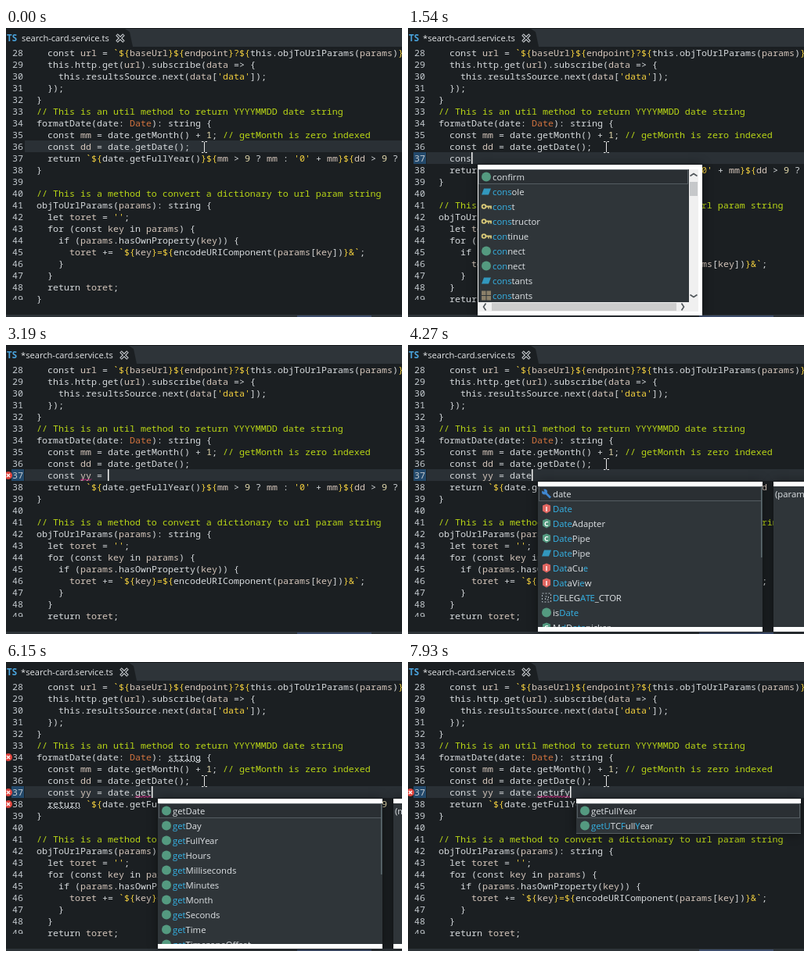
Animation of 506x370 px, one loop 8000 ms. Source, as an HTML page with a canvas:

```html
<!DOCTYPE html>
<html lang="en">
<head>
<meta charset="utf-8">
<title>Code completion</title>
<style>
html, body { margin: 0; width: 100%; height: 100%; overflow: hidden; background: #1b1f22; }
canvas { display: block; }
</style>
</head>
<body>
<canvas id="stage" width="506" height="370"></canvas>
<script>
const ctx = document.getElementById('stage').getContext('2d');
const LOOP = 8000, COL = 7, ROW = 15, LEFT = 25, TOP = 24, FIRST = 28;
const MONO = '11.667px "Noto Sans Mono", monospace';
const UI = '11.3px "Open Sans", sans-serif';
const BG = '#1b1f22', PANEL = '#2f3539', TEXT = '#d6dadd', CYAN = '#35b4e8', PINK = '#e8208a';

const head = [
  '    const url = `${baseUrl}${endpoint}?${this.objToUrlParams(params)}`;',
  '    this.http.get(url).subscribe(data => {',
  "      this.resultsSource.next(data['data']);",
  '    });',
  '  }',
  '  // This is an util method to return YYYYMMDD date string',
  '  formatDate(date: Date): string {',
  '    const mm = date.getMonth() + 1; // getMonth is zero indexed',
  '    const dd = date.getDate();'
];
const tail = [
  "    return `${date.getFullYear()}${mm > 9 ? mm : '0' + mm}${dd > 9 ? dd : '0' + dd}`;",
  '  }',
  '',
  '  // This is a method to convert a dictionary to url param string',
  '  objToUrlParams(params): string {',
  "    let toret = '';",
  '    for (const key in params) {',
  '      if (params.hasOwnProperty(key)) {',
  '        toret += `${key}=${encodeURIComponent(params[key])}&`;',
  '      }',
  '    }',
  '    return toret;',
  '  }'
];

const withIcon = (icon, names) => names.split(' ').map(name => ({ icon, name }));
const lists = {
  cons: [
    ...withIcon('dot', 'confirm'), ...withIcon('slab', 'console'),
    ...withIcon('key', 'const constructor continue'),
    ...withIcon('dot', 'connect connect'), ...withIcon('slab', 'constants'),
    ...withIcon('grid', 'constants')
  ],
  date: [
    ...withIcon('wrench', 'date'), ...withIcon('I', 'Date'),
    ...withIcon('C', 'DateAdapter DatePipe'), ...withIcon('slab', 'DatePipe'),
    ...withIcon('I', 'DataCue DataView'), ...withIcon('frame', 'DELEGATE_CTOR'),
    ...withIcon('dot', 'isDate'), ...withIcon('C', 'MdDatepicker')
  ],
  get: withIcon('dot', 'getDate getDay getFullYear getHours getMilliseconds getMinutes getMonth getSeconds getTime getTimezoneOffset'),
  getu: withIcon('dot', 'getFullYear getMinutes getUTCDate getUTCDay getUTCFullYear getUTCHours getUTCMilliseconds getUTCMinutes getUTCMonth getUTCSeconds'),
  year: withIcon('dot', 'getFullYear getUTCFullYear'),
  none: [{ icon: '', name: 'No Default Proposals' }]
};

// Each step changes only the listed properties of the state.
const steps = [
  [0, { added: false, typed: '', caret: false, mouse: true, list: '', query: '', info: '', bad: [], mark: null, hints: false }],
  [290, { caret: true }],
  [610, { added: true, mouse: false }],
  [1310, { typed: 'c' }],
  [1390, { typed: 'co' }],
  [1470, { typed: 'con' }],
  [1540, { typed: 'cons', list: 'cons', query: 'cons', mouse: true }],
  [1620, { typed: 'const', query: 'const' }],
  [1850, { typed: 'const ', list: '' }],
  [2230, { bad: [37] }],
  [2400, { typed: 'const y', mouse: false }],
  [2470, { typed: 'const yy' }],
  [2550, { list: 'none', query: '', mouse: true }],
  [2870, { typed: 'const yy ' }],
  [2940, { list: '' }],
  [3020, { typed: 'const yy =', mark: [6, 8] }],
  [3190, { typed: 'const yy = ', mouse: false }],
  [3490, { typed: 'const yy = d' }],
  [3570, { typed: 'const yy = da' }],
  [3720, { typed: 'const yy = dat' }],
  [3800, { typed: 'const yy = date' }],
  [3960, { list: 'date', query: 'date', mouse: true }],
  [4190, { bad: [], mark: null }],
  [4270, { info: '(parameter) date: Date' }],
  [4820, { list: '', info: '' }],
  [5200, { typed: 'const yy = date.', mouse: false }],
  [5370, { list: 'get', query: '', mouse: true }],
  [5520, { typed: 'const yy = date.g', query: 'g' }],
  [5600, { typed: 'const yy = date.ge', query: 'ge' }],
  [5680, { typed: 'const yy = date.get', query: 'get' }],
  [5760, { bad: [34, 38], hints: true }],
  [5840, { info: '(method) Date.getDate(): number' }],
  [6150, { bad: [34, 37, 38], mark: [16, 19] }],
  [6450, { typed: 'const yy = date.getu', list: 'getu', query: 'getu', info: '' }],
  [6760, { typed: 'const yy = date.getuf', query: 'getuf' }],
  [6840, { list: 'year' }],
  [6930, { bad: [37], hints: false }],
  [7160, { mark: null }],
  [7230, { mark: [16, 21] }],
  [7540, { typed: 'const yy = date.getufy', query: 'getufy' }],
  [7860, { mark: null }],
  [7930, { mark: [16, 22] }]
];

function stateAt(time) {
  return Object.assign({}, ...steps.filter(([at]) => at <= time).map(([, change]) => change));
}

function rect(x, y, w, h, color) {
  ctx.fillStyle = color;
  ctx.fillRect(x, y, w, h);
}

function write(text, x, y, color, font) {
  ctx.font = font;
  ctx.fillStyle = color;
  ctx.fillText(text, x, y);
}

function path(points, color, width) {
  ctx.beginPath();
  points.forEach(([x, y]) => ctx.lineTo(x, y));
  if (width) {
    ctx.strokeStyle = color;
    ctx.lineWidth = width;
    ctx.stroke();
  } else {
    ctx.fillStyle = color;
    ctx.fill();
  }
}

function disc(x, y, r, color) {
  ctx.beginPath();
  ctx.arc(x, y, r, 0, Math.PI * 2);
  ctx.fillStyle = color;
  ctx.fill();
}

function cross(x, y, r, color, width) {
  path([[x - r, y - r], [x + r, y + r]], color, width);
  path([[x - r, y + r], [x + r, y - r]], color, width);
}

function clipped(x, y, w, h, draw) {
  ctx.save();
  ctx.beginPath();
  ctx.rect(x, y, w, h);
  ctx.clip();
  draw();
  ctx.restore();
}

const lineTop = n => TOP + 0.5 + (n - FIRST) * ROW - 0.5;
const colX = c => LEFT + c * COL;

const tokens = /(\/\/.*)|('[^']*'|`|\$\{|\}[?=&]?(?=[$`]))|\b(Date)\b|\b(mm|dd|yy|url|key|params|toret|data|baseUrl|endpoint)\b|\b(\d+)\b/g;
const tokenColors = ['#b9d616', '#f2cf3e', '#d2733f', '#d5c6bb', '#e6dcae'];

function codeLine(text, y) {
  let at = 0;
  const put = (part, color) => {
    write(part, colX(at), y, color, MONO);
    at += part.length;
  };
  for (const m of text.matchAll(tokens)) {
    put(text.slice(at, m.index), TEXT);
    put(m[0], tokenColors[m.slice(1).findIndex(Boolean)]);
  }
  put(text.slice(at), TEXT);
}

function squiggle(x0, x1, y, color) {
  const points = [];
  for (let x = x0; x <= x1; x += 2) points.push([x, y + ((x - x0) % 4 ? -1 : 1)]);
  path(points, color, 1);
}

function tabBar(added) {
  const shift = added ? 5 : 0;
  rect(0, 0, 506, 24, '#2e3439');
  path([[0, 1], [152 + shift, 1], [158 + shift, 5], [162 + shift, 24], [0, 24]], BG);
  rect(0, 0, 506, 1, '#181c1f');
  write('TS', 1, 17, '#4aa3dc', 'bold 11.5px "Open Sans", sans-serif');
  write((added ? '*' : '') + 'search-card.service.ts', added ? 19 : 20, 17, '#e4e6e8', '11.15px "Open Sans", sans-serif');
  cross(146 + shift, 13, 4.5, '#d5d9dc', 3.6);
  cross(146 + shift, 13, 4, BG, 1.5);
}

function editor(s) {
  const lines = s.added ? [...head, '    ' + s.typed, ...tail] : [...head, ...tail];
  const active = s.added ? 37 : 36;
  const y = lineTop(active);
  rect(LEFT - 1, y, 506, ROW, '#2a3035');
  if (s.added) rect(7, y, 16, ROW, '#23496b');
  clipped(0, TOP, 506, 334, () => lines.forEach((line, i) => codeLine(line, lineTop(FIRST + i) + 12)));
  clipped(0, TOP, LEFT, 324, () => lines.forEach((_, i) =>
    write(FIRST + i, 8, lineTop(FIRST + i) + 12, '#c3c9ce', MONO)));

  s.bad.forEach(n => {
    disc(3, lineTop(n) + 8, 5, '#e0433c');
    cross(3, lineTop(n) + 8, 2, '#fff', 1.4);
  });
  if (s.hints) {
    squiggle(colX(26), colX(32), 127, '#aeb4b8');
    squiggle(colX(4), colX(10), 187, '#aeb4b8');
  }
  if (s.mark) squiggle(colX(4 + s.mark[0]), colX(4 + s.mark[1]), 172.5, PINK);
  if (s.caret) rect(s.added ? colX(4 + s.typed.length) : 235, y, 1.5, ROW, '#f4f4f4');

  rect(0, 367, 506, 3, '#2d3338');
  rect(372, 368, 95, 2, '#3e4d6c');
}

function mousePointer() {
  const x = 253.5;
  path([[x, 146], [x, 159]], '#e8e8e8', 1);
  [145.5, 159.5].forEach(y => {
    path([[x - 3.5, y], [x - 1, y]], '#e8e8e8', 1);
    path([[x + 1, y], [x + 3.5, y]], '#e8e8e8', 1);
  });
}

function icon(kind, x, y) {
  const green = '#549a80', gold = '#d9c978';
  if (kind === 'dot') disc(x, y, 6, green);
  if (kind === 'slab') path([[x - 3, y - 4], [x + 6, y - 4], [x + 3, y + 4], [x - 6, y + 4]], '#3297bd');
  if (kind === 'key') {
    ctx.beginPath();
    ctx.arc(x - 3, y, 2.4, 0, 7);
    ctx.strokeStyle = gold;
    ctx.lineWidth = 1.8;
    ctx.stroke();
    path([[x - 1, y], [x + 6, y], [x + 6, y + 3]], gold, 1.8);
    path([[x + 3, y], [x + 3, y + 3]], gold, 1.5);
  }
  if (kind === 'grid') {
    for (let i = 0; i < 4; i++) rect(x - 6 + (i % 2) * 6.5, y - 6 + (i >> 1) * 6.5, 5.5, 5.5, '#8b8069');
  }
  if (kind === 'wrench') {
    path([[x - 2, y - 2], [x + 5, y + 5]], '#3f86cf', 2.6);
    disc(x - 2.5, y - 2.5, 3.5, '#3f86cf');
    path([[x - 2.5, y - 2.5], [x - 4, y - 7], [x - 7, y - 4]], PANEL);
  }
  if (kind === 'I' || kind === 'C') {
    path([[x - 5, y - 4], [x, y - 6], [x + 5, y - 4], [x + 5, y + 3], [x, y + 6], [x - 5, y + 3]], kind === 'I' ? '#e16661' : green);
    write(kind, x - (kind === 'I' ? 1.4 : 3), y + 3.5, '#fff', 'bold 9px "Open Sans", sans-serif');
  }
  if (kind === 'frame') {
    ctx.setLineDash([2, 2]);
    ctx.strokeStyle = '#aeb8bf';
    ctx.lineWidth = 1;
    ctx.strokeRect(x - 5.5, y - 5.5, 11, 11);
    ctx.strokeRect(x - 1.5, y - 1.5, 4, 4);
    ctx.setLineDash([]);
  }
}

// Colours the letters of the name that follow the query in order.
function proposal(name, x, y, query) {
  ctx.font = UI;
  let next = 0, done = '';
  for (const ch of name) {
    const hit = next < query.length && ch.toLowerCase() === query[next];
    if (hit) next++;
    write(ch, x + ctx.measureText(done).width, y, hit ? CYAN : '#dfe3e6', UI);
    done += ch;
  }
}

function panel(x, y, w, h) {
  ctx.save();
  ctx.shadowColor = 'rgba(0,0,0,.45)';
  ctx.shadowBlur = 12;
  rect(x, y, w, h, PANEL);
  ctx.restore();
}

function scrollBars(x) {
  rect(x, 181, 1, 186, '#f4f4f4');
  rect(x + 270, 181, 12, 170, '#f0f0f0');
  rect(x + 282, 181, 5, 186, '#fff');
  rect(x + 271, 197, 10, 18, '#c6c8ca');
  rect(x + 1, 351, 281, 12, '#f0f0f0');
  rect(x + 18, 352, 236, 10, '#cdcdcd');
  rect(x, 363, 287, 5, '#fff');
  const arrow = (cx, cy, dx, dy) =>
    path([[cx - dx - dy * 3, cy - dy - dx * 3], [cx + dx, cy + dy], [cx - dx + dy * 3, cy - dy + dx * 3]], '#50565a', 1.6);
  arrow(x + 276, 188, 0, -1.5);
  arrow(x + 276, 343, 0, 1.5);
  arrow(x + 9, 357, -1.5, 0);
  arrow(x + 262, 357, 1.5, 0);
}

function popup(s) {
  const items = lists[s.list], x = colX(4 + s.typed.length) + 8;
  const tall = items.length > 2, bars = s.list === 'cons';
  const bottom = tall ? 361 : 181 + items.length * 19;
  const width = bars ? 270 : 287;
  panel(x, 175, 287, (tall ? 367 : bottom + 1) - 175);
  rect(x, 175, 287, 6, '#fff');
  rect(x + 1, 181, width - 2, 19, '#2a2f33');
  ctx.strokeStyle = '#555d62';
  ctx.lineWidth = 1;
  ctx.strokeRect(x + 1.5, 181.5, width - 3, 18);
  clipped(x, 181, width, bottom - 181, () => items.forEach((item, i) => {
    const y = 190.5 + i * 19;
    icon(item.icon, x + 11, y);
    proposal(item.name, x + 19, y + 4, i ? s.query : '');
  }));
  if (bars) scrollBars(x);
  else if (tall) {
    rect(x, 361, 287, 6, '#fff');
    rect(x + 285, 182, 1.5, s.query ? 90 : 38, '#5d6b70');
  } else rect(x, bottom, 287, 1, '#555d62');

  if (s.info) {
    const left = x + 301;
    panel(left, 175, 300, 192);
    rect(left, 175, 300, 6, '#fff');
    rect(left, 361, 300, 6, '#fff');
    write(s.info, left + 2, 195, '#dfe3e6', UI);
  }
}

function frame(now) {
  const s = stateAt(now % LOOP);
  rect(0, 0, 506, 370, BG);
  tabBar(s.added);
  editor(s);
  if (s.mouse) mousePointer();
  if (s.list) popup(s);
  requestAnimationFrame(frame);
}

const start = performance.now();
const tick = () => Math.max(0, performance.now() - start);
const raf = window.requestAnimationFrame.bind(window);
window.requestAnimationFrame = draw => raf(() => draw(tick()));
frame(0);
</script>
</body>
</html>
```
